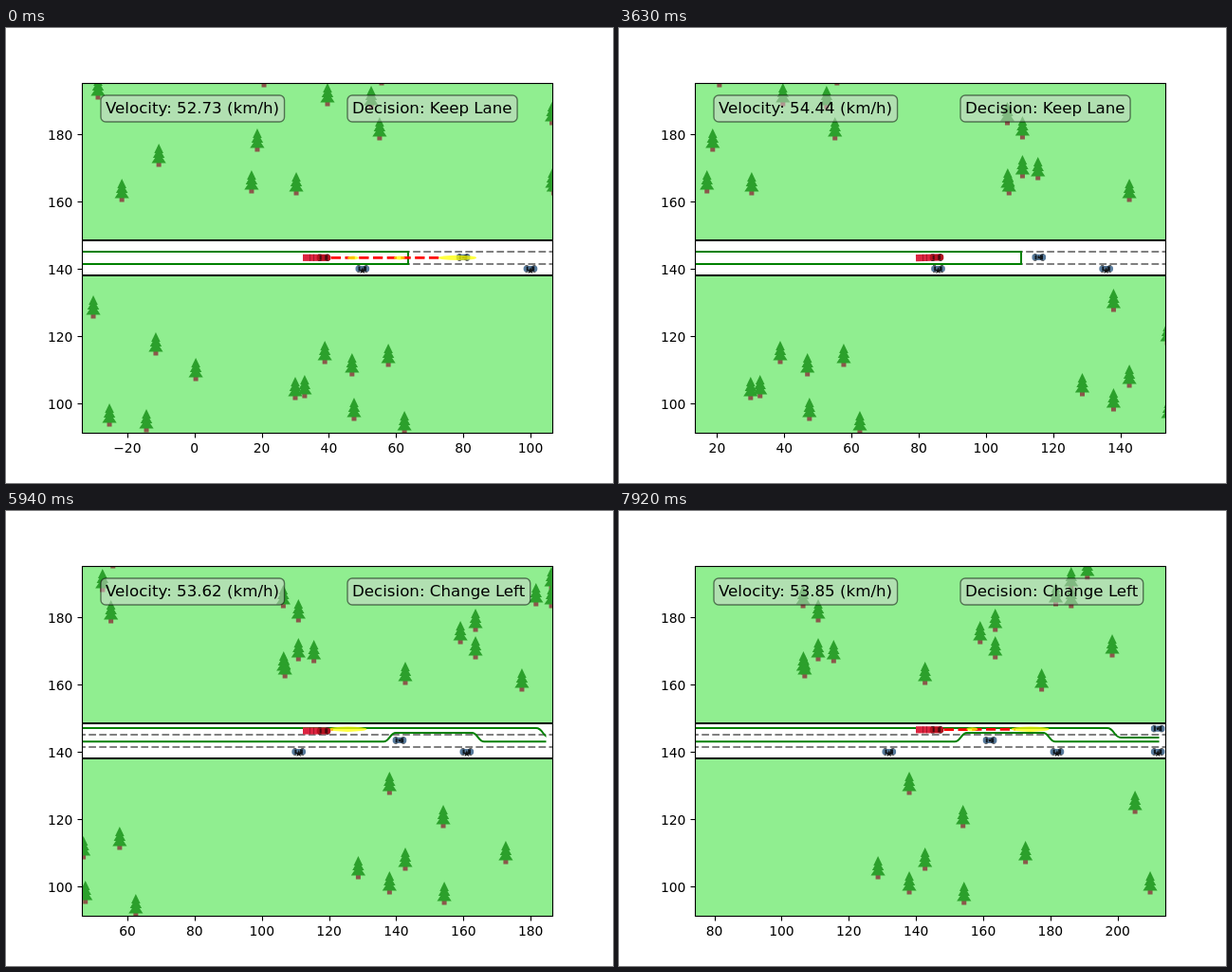
These frames come from a looping animation (640 px wide and 480 px high, 8000 ms). An HTML page with a canvas:

```html
<!DOCTYPE html>
<html lang="en">
<head>
<meta charset="utf-8">
<title>Lane planner</title>
<style>
  html, body { margin: 0; width: 100%; height: 100%; overflow: hidden; background: #fff; }
  canvas { display: block; }
</style>
</head>
<body>
<canvas id="stage" width="640" height="480"></canvas>
<script>
const ctx = document.getElementById('stage').getContext('2d');
const LOOP = 8000, STEP = 330, SCALE = 496 / 140;
const EGO_X = 328;
const DEG = Math.PI / 180;

// step, left edge of the view, first traffic car, km/h, corridor bump, ego y (px), ego angle
const KEYS = [
  [0, -33.5, 50, 52.73, 0, 242.3, 0],
  [1, -33.2, 50.2, 52.3, 0, 242.3, 0],
  [4, -20.3, 60.4, 50.82, 0, 242.3, 0],
  [8, -2, 74, 54.42, 0, 242.3, 0],
  [9, 2.4, 77.4, 54.43, 0, 242.3, 0],
  [12, 18.9, 90, 54.45, 123.7, 242.2, -2],
  [14, 28.15, 97, 54.47, 132.9, 238.8, -10],
  [16, 37.3, 104, 54.1, 142, 233.5, -5],
  [18, 46.45, 111, 53.62, 151.2, 232, 0],
  [20, 58.3, 120, 54.13, 151.2, 230.7, -3],
  [21, 60.4, 121.6, 54.06, 155, 230.7, -2],
  [24, 74.2, 132, 53.85, 166.5, 230.8, 0]
];

// world x, top of the tree in px
const TREES = [
  [-28.7, 51], [20.7, 38], [39.6, 58], [52.6, 61], [55.1, 94], [55.7, 36], [18.7, 106],
  [-10.6, 122], [-21.6, 159], [17, 150], [30.3, 152], [106.4, 78], [106.5, 148],
  [106.9, 152], [110.9, 93], [110.9, 134], [115.5, 136], [142.7, 159], [159.1, 116],
  [163.6, 103], [163.6, 132], [177.4, 166], [181.6, 76], [186.2, 59], [186.2, 78],
  [191, 48], [198.4, 130],
  [-30.1, 282], [-11.5, 321], [0.4, 348], [-25.3, 396], [-14.3, 402], [38.8, 330],
  [46.9, 343], [57.7, 333], [30, 368], [32.8, 366], [47.5, 390], [62.5, 404],
  [138, 275], [128.7, 364], [138, 380], [142.7, 355], [154, 310], [154.3, 391],
  [172.6, 348], [205.2, 295], [209.7, 380]
];

function stateAt(step) {
  const i = Math.max(1, KEYS.findIndex(key => key[0] >= step));
  const a = KEYS[i - 1], b = KEYS[i];
  const f = (step - a[0]) / (b[0] - a[0]);
  const [, left, traffic, speed, bump, egoY, angle] = a.map((v, n) => v + (b[n] - v) * f);
  return { step, left, traffic, speed, bump, egoY, angle, changing: step >= 12 };
}

const yOf = y => 254 - (y - 140) * SCALE;

function rect(color, x, y, w, h) {
  ctx.fillStyle = color;
  ctx.fillRect(x, y, w, h);
}

function line(color, width, points, dash = [], offset = 0) {
  ctx.strokeStyle = color;
  ctx.lineWidth = width;
  ctx.setLineDash(dash);
  ctx.lineDashOffset = offset;
  ctx.beginPath();
  points.forEach(p => ctx.lineTo(...p));
  ctx.stroke();
  ctx.setLineDash([]);
}

function drawTree(x, top) {
  rect('#8c564b', x - 2.5, top + 19, 5, 5.5);
  ctx.fillStyle = '#2ca02c';
  for (const [start, end, half] of [[0, 10, 4.8], [4, 15, 6.2], [9, 20.5, 7.6]]) {
    ctx.beginPath();
    ctx.moveTo(x, top + start);
    ctx.lineTo(x + half, top + end);
    ctx.lineTo(x - half, top + end);
    ctx.fill();
  }
}

function drawStar(x, y, r) {
  ctx.fillStyle = '#111';
  ctx.beginPath();
  for (let i = 0; i < 10; i++) {
    const d = i % 2 ? r * 0.4 : r, a = (i * 36 - 90) * DEG;
    ctx.lineTo(x + d * Math.cos(a), y + d * Math.sin(a));
  }
  ctx.fill();
}

function drawCar(x, y, body, glass) {
  rect('#222', x - 5.5, y - 3.7, 3, 7.4);
  rect('#222', x + 2.5, y - 3.7, 3, 7.4);
  ctx.fillStyle = body;
  ctx.beginPath();
  ctx.roundRect(x - 7.3, y - 3.1, 14.6, 6.2, 2);
  ctx.fill();
  rect(glass, x - 4.3, y - 2.4, 2, 4.8);
  rect(glass, x + 1.2, y - 2.6, 3, 5.2);
}

function drawEgo({ egoY, angle }) {
  ctx.save();
  ctx.translate(EGO_X, egoY);
  ctx.rotate(angle * DEG);
  rect('#dc2440', -15, -3.6, 27, 7.2);
  for (const x of [-8, -4, 1]) rect('rgba(120,10,25,.55)', x, -3.6, 1, 7.2);
  drawCar(7, 0, '#b5121f', '#4a0a10');
  ctx.restore();
}

function drawRoad() {
  const top = yOf(148.5), bottom = yOf(138);
  rect('#fff', 80, top, 497, bottom - top);
  for (const y of [top, bottom]) line('#000', 2, [[80, Math.round(y)], [577, Math.round(y)]]);
  for (const y of [145, 141.5]) {
    const py = Math.round(yOf(y));
    line('#808080', 2.08, [[-1, py], [577, py]], [7.7, 3.33]);
  }
}

function drawCorridor({ changing, bump }, xOf) {
  if (!changing) {
    line('#008000', 2, [[60, 236], [424, 236], [424, 249], [60, 249]]);
    return;
  }
  const c = xOf(bump);
  const bend = (x0, x1, y0, y1) => {
    const m = (x0 + x1) / 2;
    ctx.lineTo(x0, y0);
    ctx.bezierCurveTo(m, y0, m, y1, x1, y1);
  };
  ctx.save();
  ctx.beginPath();
  ctx.rect(80, 200, 489.5, 80);
  ctx.clip();
  ctx.strokeStyle = '#008000';
  ctx.lineWidth = 2;
  ctx.beginPath();
  ctx.moveTo(60, 229);
  bend(c + 108, c + 122, 229, 239);
  ctx.lineTo(600, 239);
  ctx.moveTo(60, 243.3);
  bend(c - 53, c - 40, 243.3, 234);
  bend(c + 40, c + 53, 234, 243.3);
  ctx.lineTo(600, 243.3);
  ctx.stroke();
  ctx.restore();
}

function drawTrajectory({ step, egoY, changing }, xOf) {
  const end = step < 12 ? 83.9 : step < 20 ? 131.2 : 179.6;
  const y = changing ? 230.2 : 242.4;
  const stop = xOf(end - 10), merge = xOf(101);
  if (stop > EGO_X) {
    const points = [[EGO_X, egoY], [stop, y]];
    if (changing && merge > EGO_X) points.splice(1, 0, [merge, y]);
    line('#f00', 2.78, points, [10.3, 4.44]);
  }
  ctx.fillStyle = 'rgba(255,255,0,.75)';
  for (const [back, rx, ry] of [[36.7, 6, 1.8], [22.9, 6, 2], [5.6, 20, 2.7]]) {
    const x = xOf(end - back);
    if (x < EGO_X) continue;
    ctx.beginPath();
    ctx.ellipse(x, y, rx, ry, 0, 0, 2 * Math.PI);
    ctx.fill();
  }
}

function drawLabel(text, x) {
  ctx.font = '16.67px "DejaVu Sans", sans-serif';
  ctx.textAlign = 'left';
  ctx.beginPath();
  ctx.roundRect(x - 5, 71, ctx.measureText(text).width + 10.5, 28, 5);
  ctx.fillStyle = 'rgba(211,211,211,.5)';
  ctx.fill();
  ctx.strokeStyle = 'rgba(0,0,0,.5)';
  ctx.lineWidth = 1.39;
  ctx.stroke();
  ctx.fillStyle = '#000';
  ctx.fillText(text, x, 90);
}

function drawAxes(left, xOf) {
  ctx.strokeStyle = '#000';
  ctx.lineWidth = 1.11;
  ctx.strokeRect(80.5, 58.5, 496, 369);
  ctx.font = '13.89px "DejaVu Sans", sans-serif';
  ctx.fillStyle = '#000';
  ctx.textAlign = 'center';
  for (let v = Math.ceil(left / 20) * 20; v <= left + 140; v += 20) {
    const x = Math.round(xOf(v)) + 0.5;
    line('#000', 1.11, [[x, 427.5], [x, 432.5]]);
    ctx.fillText(String(v).replace('-', '\u2212'), xOf(v), 448);
  }
  ctx.textAlign = 'right';
  for (let v = 100; v <= 180; v += 20) {
    const y = Math.round(yOf(v)) + 0.5;
    line('#000', 1.11, [[75.5, y], [80.5, y]]);
    ctx.fillText(v, 70.4, y + 5);
  }
}

function draw(step) {
  const s = stateAt(step);
  const xOf = x => 80 + (x - s.left) * SCALE;

  rect('#fff', 0, 0, 640, 480);
  ctx.save();
  ctx.beginPath();
  ctx.rect(80, 58, 497, 370);
  ctx.clip();
  rect('#90ee90', 80, 58, 497, 370);
  for (const [x, top] of TREES) drawTree(xOf(x), top);
  drawRoad();
  drawCorridor(s, xOf);
  for (const [ahead, lane] of [[0, 140], [50, 140], [80, 140], [30, 143.4], [80, 146.9]]) {
    const x = xOf(s.traffic + ahead), y = yOf(lane);
    drawCar(x, y, '#567a9c', '#101820');
    drawStar(x, y + (lane === 140 ? 2 : 0), lane === 140 ? 4 : 2.5);
  }
  drawTrajectory(s, xOf);
  drawEgo(s);
  ctx.restore();

  drawAxes(s.left, xOf);
  drawLabel(`Velocity: ${s.speed.toFixed(2)} (km/h)`, 105);
  drawLabel(`Decision: ${s.changing ? 'Change Left' : 'Keep Lane'}`, 365);
}

function tick() {
  draw(Math.floor((performance.now() % LOOP) / STEP));
  requestAnimationFrame(tick);
}
tick();
</script>
</body>
</html>
```
